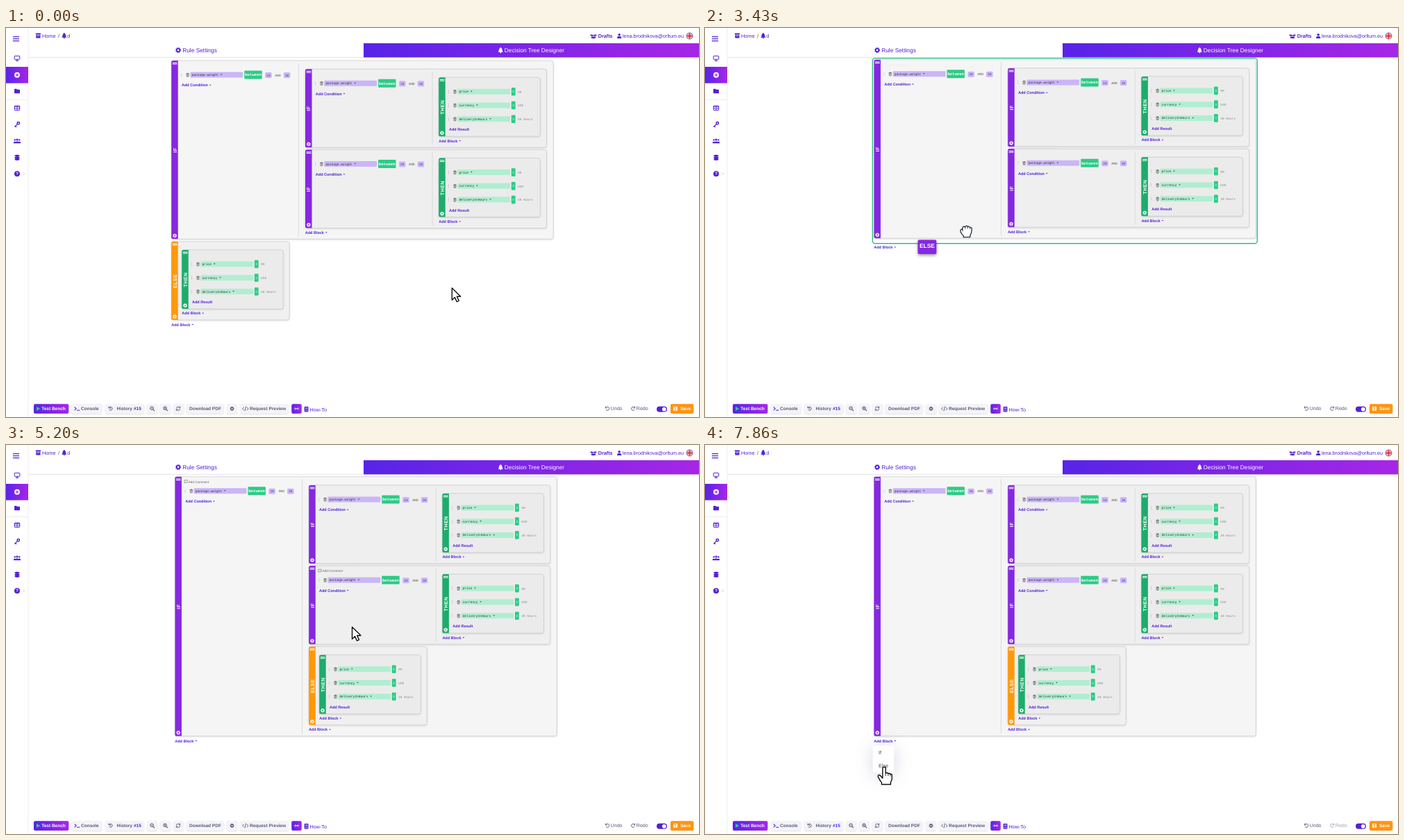
An HTML page that plays this animation: 998x561 px, repeating every 8 s.

```html
<!DOCTYPE html>
<html lang="en">
<head>
<meta charset="utf-8">
<title>Decision Tree Designer</title>
<style>
  html, body { margin: 0; width: 100%; height: 100%; overflow: hidden; background: #fff; }
  svg { display: block; width: 998px; height: 561px; font-family: "Liberation Sans", Arial, sans-serif; text-rendering: geometricPrecision; }
  .mono { font-family: "Liberation Mono", "Courier New", monospace; }
  .b { font-weight: bold; }
  .card { stroke: #cfcfcf; stroke-width: .8; }
  .soft { filter: drop-shadow(0 1px 1px rgba(0, 0, 0, .12)); }
  .tile { filter: drop-shadow(0 2px 2px rgba(0, 0, 0, .4)); }
  .menu { filter: drop-shadow(0 3px 12px rgba(70, 60, 120, .22)); }
  .cursor { fill: #fff; stroke: #111; stroke-width: 1.4; stroke-linejoin: round; stroke-linecap: round; }
  .grab { stroke: #2b3440; }
</style>
</head>
<body>
<svg id="stage" viewBox="0 0 998 561" xmlns="http://www.w3.org/2000/svg">
  <defs>
    <linearGradient id="grad"><stop stop-color="#5624e8"/><stop offset="1" stop-color="#a726e6"/></linearGradient>
    <clipPath id="round"><circle r="4.9"/></clipPath>
  </defs>
</svg>
<script>
const LOOP = 8000;
const C = { main: '#5122d6', ink: '#54597a', violet: '#8528e0', green: '#1dac6c', orange: '#ff9808',
            lime: '#2ecb87', mint: '#b0eed1', lilac: '#cab5f8' };
const stage = document.getElementById('stage');

// Drawing helpers
const rect = (x, y, w, h, fill, r = 0, more = '') =>
  `<rect x="${x}" y="${y}" width="${w}" height="${h}" rx="${r}" fill="${fill}" ${more}/>`;
const circle = (x, y, r, fill, more = '') => `<circle cx="${x}" cy="${y}" r="${r}" fill="${fill}" ${more}/>`;
const path = (d, fill, more = '') => `<path d="${d}" fill="${fill}" ${more}/>`;
const line = (d, color, w = 1) => path(d, 'none', `stroke="${color}" stroke-width="${w}" stroke-linecap="round" stroke-linejoin="round"`);
const at = (x, y, body, more = '') => `<g transform="translate(${x} ${y})" ${more}>${body}</g>`;
const text = (x, y, s, size, fill, cls = '', more = '') =>
  `<text x="${x}" y="${y + size * .35}" font-size="${size}" fill="${fill}" class="${cls}" ${more}>${s}</text>`;
const mid = 'text-anchor="middle"';
const caret = (x, y, fill) => path(`M${x - 1.4} ${y - .7}h2.8l-1.4 1.5z`, fill);

const gear = (x, y, r, color) =>
  circle(x, y, r * .58, 'none', `stroke="${color}" stroke-width="${r * .45}"`) +
  circle(x, y, r * .85, 'none', `stroke="${color}" stroke-width="${r * .35}" stroke-dasharray="${r * .334}"`);
const trash = (x, y) =>
  rect(x - 1.5, y - 1.2, 3, 3.8, 'none', .5, 'stroke="#555" stroke-width=".7"') +
  line(`M${x - 2} ${y - 1.6}h4M${x - .6} ${y - 2.3}h1.2M${x} ${y - .4}v2`, '#555', .6);
const dots = (x, y) => [-1.8, 0, 1.8].map(d => circle(x, y + d, .45, '#888')).join('');
const tree = (x, y, color) =>
  at(x, y, path('M0-4.2 2.4-1.4H1.5L3.1.6H2L3.6 2.8H.7V4.2H-.7V2.8H-3.6L-2 .6H-3.1L-1.5-1.4H-2.4z', color));
const person = (x, y, s, color) =>
  at(x, y, circle(0, -1.8, 1.8, color) + path('M-3.1 3.6V2.4Q-3 .5-1 .5H1Q3 .5 3.1 2.4V3.6z', color), `transform-origin="0 0"`)
    .replace('translate(', `scale(1) translate(`).replace(/\) ?"/, `) scale(${s})"`);

// Decision blocks
const link = (x, y, s, em) => text(x, y, s, 5.5, C.main, 'b') + caret(x + em * 5.5 + 3.3, y, C.main);
const addBlock = (x, y) => link(x, y, 'Add Block', 4.945);

function block(x, y, w, h, label, color, fill) {
  const cy = y + h / 2 + .5;
  return rect(x, y, w, h, fill, 3, 'class="card soft"') +
    path(`M${x + 9.5} ${y}v${h}H${x + 2}q-2 0-2-2V${y + 2}q0-2 2-2z`, color) +
    line(`M${x + 1.9} ${y + 3.2}h6M${x + 1.9} ${y + 5}h6`, '#fff', 1) +
    gear(x + 4.8, y + h - 4.8, 2.9, '#fff') +
    `<g transform="translate(${x + 4.9} ${cy}) rotate(-90)">${text(0, 0, label, 7, '#fff', 'b', mid + ' letter-spacing=".5"')}</g>`;
}

const field = (x, y, s, fill) => rect(x, y - 4, 75.8, 8, fill, 1) +
  text(x + 2.2, y, s, 4.55, '#333', 'mono') + caret(x + 6.4 + s.length * 2.73, y - .3, '#444');

function thenBlock(x, y) {
  const rows = [['price', '99'], ['currency', 'USD'], ['deliveryInHours', '48 Hours']];
  return block(x, y, 146, 85, 'THEN', C.green, '#ebebeb') +
    rows.map(([name, value], i) => {
      const cy = y + 20.5 + i * 19.75;
      return dots(x + 14.4, cy) + trash(x + 23.3, cy) + field(x + 27, cy, name, C.mint) +
        rect(x + 104.6, cy - 5.8, 5.8, 11.6, C.lime, 1) +
        text(x + 107.5, cy, '=', 4.5, '#fff', 'mono b', mid) +
        text(x + 113.8, cy + .3, value, 4.55, '#888', 'mono');
    }).join('') +
    text(x + 14.8, y + 75.2, 'Add Result', 5.5, C.main, 'b') + addBlock(x, y + 91.5);
}

const pill = (x, y, s) => rect(x, y - 4, 9.4, 8, C.lilac, 1.5) + text(x + 4.7, y + .2, s, 4.5, '#5530a8', 'mono', mid);

function ifBlock(x, y, w, h, from, to, fill) {
  const cy = y + 20.5;
  return block(x, y, w, h, 'IF', C.violet, fill) +
    dots(x + 14.6, cy) + trash(x + 23.4, cy) + field(x + 27.2, cy, 'package.weight', C.lilac) +
    rect(x + 105, cy - 6, 25.5, 12, C.lime, 1) + text(x + 117.7, cy, 'between', 5.7, '#fff', 'mono b', mid) +
    pill(x + 135, cy + .5, from) + text(x + 149, cy + .5, 'AND', 4.8, '#555', 'mono') + pill(x + 161.7, cy + .5, to) +
    link(x + 14.8, y + 35.5, 'Add Condition', 6.888) +
    line(`M${x + 183} ${y + 4}V${y + h - 4}`, '#d3d3d3', .8);
}

const innerIf = (x, y, from, to) =>
  ifBlock(x, y, 347.5, 113, from, to, '#efefef') + thenBlock(x + 192.2, y + 12);
const elseBlock = (x, y) => block(x, y, 170, 113, 'ELSE', C.orange, '#f0f0f0') + thenBlock(x + 15, y + 12);

const outer = (x, y, h, gap = 0) =>
  ifBlock(x, y, 550, h, '10', '30', '#f5f5f5') +
  innerIf(x + 192.8, y + 12.2, '10', '20') + innerIf(x + 192.8, y + 128.6 + gap, '20', '30') +
  addBlock(x + 192.5, y + h - 9.3);

const outline = (x, y, w, h) => rect(x, y, w, h, 'none', 3.5, 'stroke="#2fbd87" stroke-width="1.4"');
const comment = (x, y) =>
  path(`M${x + 13.6} ${y + 5}h4.2v3.4h-2.6l-1 1v-1h-.6z`, 'none', 'stroke="#666" stroke-width=".6"') +
  text(x + 19.4, y + 7.3, 'Add Comment', 4.6, '#666');

// Page frame
function sidebar() {
  const m = C.main;
  return rect(0, 0, 32, 561, '#fff') + line('M32 0V561', '#eeeef4', 1) +
    line('M10.4 12.7h8.2M10.4 15.7h8.2M10.4 18.7h8.2', m, 1.2) +
    rect(12.2, 40.3, 7.6, 5, 'none', .8, `stroke="${m}"`) + line('M14.2 47.3h3.6M16 45.5v1.5', m, 1) +
    rect(0, 56, 32, 23.6, 'url(#grad)') + circle(16, 67.8, 4, '#fff') + line('M14 67.8h4M16 65.8v4', '#7526e6', 1.1) +
    path('M12 88.5q0-.7.7-.7h2.4l1 1h3.2q.7 0 .7.7v4q0 .7-.7.7h-6.6q-.7 0-.7-.7z', m) +
    line('M0 103.5H31', '#e8e8f0', .8) +
    rect(12.3, 112.3, 7.4, 6.2, 'none', .6, `stroke="${m}"`) + line('M12.3 113.2h7.4M12.3 115.8h7.4M16 113v5', m, .9) +
    circle(17.8, 137.2, 1.7, 'none', `stroke="${m}" stroke-width="1.5"`) + line('M16.4 138.6 12.8 142.3M13.6 141.5l1 1', m, 1.3) +
    [[-3.3, 1.2, 1.3], [3.3, 1.2, 1.3], [0, 1.6, 1.6]].map(([dx, r, w]) =>
      circle(16 + dx, 161 + (dx ? .4 : 0), r, m) +
      path(`M${16 + dx - w * 1.4} 166.3v-1q0-1.9 1.9-1.9h${w * 2.8 - 3.8}q1.9 0 1.9 1.9v1z`, m)).join('') +
    [183.4, 186, 188.6].map(y => path(`M12.6 ${y}q3.4-1.5 6.8 0v1.7q-3.4 1.6-6.8 0z`, m)).join('') +
    circle(16, 210.2, 4, m) + text(16, 210.2, '?', 6, '#fff', 'b', mid) + line('M25.2 208.8l1.3 1.4-1.3 1.4', '#aaa', .7);
}

function header() {
  const m = C.main;
  return rect(42.8, 7.6, 7.2, 2, m, .4) + rect(43.3, 10.2, 6.2, 4.2, m, .4) + line('M45.4 11.4h2', '#fff', .7) +
    text(52, 11, 'Home', 7.3, m) + text(75, 11, '/', 7.3, '#444') + tree(83.8, 11, m) + text(88.3, 11, 'd', 7.3, m) +
    path('M842 9.2l4 .8 4-.8 .6 1.8-3.4.9-1.2-1.4-1.2 1.4-3.4-.9zM842.8 12.2l2.4.5.8-.9.8.9 2.4-.5v2.2l-3.2.8-3.2-.8z', m) +
    text(852.8, 11.4, 'Drafts', 7.2, m, 'b') +
    circle(883.2, 9.7, 1.8, m) + path('M880.1 15v-1.2q.1-1.8 2-1.8h2.2q1.9 0 2 1.8V15z', m) +
    text(888, 11.4, 'lena.brodnikova@orltum.eu', 7.2, m) +
    at(984.5, 11.5, `<g clip-path="url(#round)">${rect(-5, -5, 10, 10, '#27408f')}` +
      line('M-5-5 5 5M5-5-5 5', '#fff', 2) + line('M-5-5 5 5M5-5-5 5', '#d42b3c', .8) +
      line('M-5 0H5M0-5V5', '#fff', 3.2) + line('M-5 0H5M0-5V5', '#d42b3c', 1.9) + '</g>') +
    line('M32 42.4H998', '#dcdce2', .8) +
    gear(248, 32, 3.9, m) + text(254.2, 32, 'Rule Settings', 8.35, m) +
    rect(515, 22, 483, 20.3, 'url(#grad)') + tree(712.3, 32, '#fff') + text(717.8, 32, 'Decision Tree Designer', 8.3, '#fff');
}

const button = (x, w, fill = '#f4f4f8') => rect(x, 542.3, w, 13.6, fill, 2, 'class="soft"');
const zoom = (x, sign) => circle(x - .5, 548.3, 2.3, 'none', `stroke="${C.ink}"`) +
  line(`M${x + 1.3} 550.1l1.8 1.8`, C.ink, 1.2) + line(`M${x - 1.6} 548.3h2.2${sign}`, C.ink, .7);
const turn = (x, flip) => `<g transform="translate(${x} 548.8) scale(${flip} 1)">` +
  line('M-2-1.5A2.6 2.6 0 1 1-1.7 2M-2.6-2.7v1.9h1.9', 'currentColor', .9) + '</g>';

function toolbar() {
  const y = 549, k = C.ink;
  const label = (x, s, color = k) => text(x, y, s, 6.5, color, 'b');
  return button(40, 50.3, 'url(#grad)') + path('M44 546l5.4 3-5.4 3z', '#26d07c') + label(51.2, 'Test Bench', '#fff') +
    button(94.5, 43.8) + line('M99 546.8l2.2 2-2.2 2M102.4 551.3h3.4', C.main, 1.1) + label(108, 'Console') +
    button(143, 56) + `<g color="${k}">${turn(150.5, 1)}</g>` + line('M150.5 547.4v1.6l1 .7', k, .7) +
    label(159.5, 'History') + label(184, '#15', C.main) +
    button(203, 15) + zoom(210.5, '') + button(222, 15) + zoom(229.5, 'm-1.1-1.1v2.2') +
    button(241, 15) + line('M245.3 548.4a2.7 2.7 0 0 1 5-.9M250.7 546v1.8h-1.8M250.7 549.4a2.7 2.7 0 0 1-5 .9M245.3 551.8V550h1.8', k, .9) +
    button(260, 53.5) + label(264, 'Download PDF') +
    button(318, 15) + gear(325.5, y, 3, k) +
    button(337, 70) + line('M342.5 547l-2 2 2 2M347 547l2 2-2 2M345.5 546l-1.4 6', k, .9) + label(351, 'Request Preview') +
    button(411.3, 14.4, 'url(#grad)') + line('M415.2 549h6.6M416.6 547.8l1.2 1.2-1.2 1.2M420.4 547.8l-1.2 1.2 1.2 1.2', '#fff', .8) +
    rect(429.6, 546, 5.9, 7.8, C.main, 1) + line('M431.2 547.8h2.8M431.2 549.2h2.8M430.8 552h4', '#fff', .6) +
    text(437.6, 550.2, 'How-To', 7.2, C.main) +
    `<g color="${k}">${turn(866, 1)}</g>` + text(870.6, y, 'Undo', 7.1, k) +
    `<g id="redo" color="${k}">${turn(903.2, -1)}${text(907.8, y, 'Redo', 7.1, 'currentColor')}</g>` +
    rect(937, 545.8, 15, 8, C.main, 4) + circle(947.8, 549.8, 2.9, '#fff') +
    button(957, 33.3, '#ff9410') + rect(961.2, 546, 5.8, 5.8, '#fff', .8) + rect(962.2, 546.8, 3.2, 1.5, '#ff9410') +
    circle(964.1, 550, 1, '#ff9410') + label(971, 'Save', '#fff');
}

// Each part is shown between two times: [start, end, markup]
const scenes = [
  [0, 3100, outer(238.2, 47, 257.3) + elseBlock(238.2, 308) + addBlock(238.2, 427.6)],
  [3100, 3900, outer(243.4, 45.7, 257.5) + addBlock(243.2, 316.2) + outline(241.3, 43.6, 554, 267.2)],
  [3900, 5200, outer(243.4, 45.7, 263.5, 1.8) + addBlock(243.2, 316.2) + outline(433.6, 55.6, 352, 239.2)],
  [5200, LOOP, outer(243.4, 45.7, 374) + elseBlock(436.2, 290.7) + addBlock(243.2, 426.8)],
];
const menu = [6900, LOOP, rect(241.6, 433.4, 30.6, 39.4, '#fff', 2.5, 'class="menu"') +
  text(250, 443, 'If', 7.2, '#444') + text(250, 462.4, 'Else', 7.2, '#444')];

// Hover hints: [x, y, fade in from, to, fade out from, to]
const hints = [
  [238.2, 308, 1040, 1300, 3099, 3100],
  [253.2, 320, 1140, 1400, 1500, 1790],
  [243.4, 45.7, 3400, 3960, 6300, 6500],
  [436.2, 176.1, 3900, 4030, 5199, 5200],
  [436.2, 174.3, 5199, 5200, 5920, 6250],
];

// Pointer: [start, end, x, y, bend of the y course]
const start = [642.3, 375];
const moves = [
  [560, 1360, 270, 336, 1],
  [1400, 1800, 240.5, 312, 1],
  [3060, 3860, 498.5, 262.5, 1.5],
  [5700, 6500, 262, 428, 1],
  [7230, 7860, 258, 464.5, 1],
];
const shapes = {
  arrow: path('M0 0V17.2L4 13.4 6.9 19.8 9.9 18.4 7.1 12.2H12.4z', '#fff', 'class="cursor"'),
  hand: path('M-2.2 2a2.2 2.2 0 0 1 4.4 0V8.6q2.4-1 3.6.7q2-.8 3.1.8q2.4-.4 2.3 2V17q0 2-1.8 4.6V25H-3.6V22.4Q-6.2 19.4-8.6 14.4q-.8-2.4 1-2.9q1.8-.3 3.2 2.1l2.2 2.3z', '#fff', 'class="cursor"') +
    line('M2.2 8.6v3.6M5.8 9.4v3M8.9 10.2v2.6', '#111', .9),
  open: path('M-5 10.5Q-6 7-9.5 2.6q-1-2.4 1-2.8q1.6 0 3.4 3L-6.6-4.6q-.4-2 1.2-2.4q1.4-.2 2 1.8L-2.4-8.4q0-2 1.6-2t1.7 2L1.3-7.8q.5-1.6 2-1.3t1.4 2.2L4.8-5q.8-1.4 2.2-.9t1.2 2.4Q8.2 3 5.6 7V10.5z', '#fff', 'class="cursor grab"') +
    line('M-3.2-5.2-2.2-.8M1-8V-1M4.7-6 4.2-.6', '#2b3440', 1),
  fist: path('M-4 8.5V6.5Q-8.5 2-8.3-1q.4-2.4 3-1.6Q-5.8-6.6-3.4-6.8q1.2-.2 1.8.8Q-.6-8.2 1-7.6q.9.3 1.2 1.2Q4-7.6 5.4-5.4Q8-6 8-3q.2 5-2.4 9.2V8.5z', '#fff', 'class="cursor grab"') +
    line('M-5.3-2.6l.2 2.4M-1.6-6l.2 2.2M2.2-6.2v2.2M5.4-5.2V-3.4', '#2b3440', .9),
};
const kinds = [[0, 'arrow'], [1134, 'hand'], [1630, 'open'], [3100, 'fist'], [4830, 'arrow'], [6440, 'hand']];

const add = markup => {
  stage.insertAdjacentHTML('beforeend', `<g>${markup}</g>`);
  return stage.lastElementChild;
};
add(header() + sidebar() + toolbar());
const timed = [...scenes, menu].map(([a, b, markup]) => [a, b, add(markup)]);
const fades = hints.map(([x, y, ...times]) => [add(comment(x, y)), times]);
const tile = add(rect(0, 0, 26.8, 20.4, C.violet, 1.8, 'class="tile"') + text(13.4, 8.4, 'ELSE', 8.4, '#fff', 'b', mid));
const pointers = Object.fromEntries(Object.entries(shapes).map(([k, markup]) => [k, add(markup)]));
const redo = document.getElementById('redo');

const ramp = (t, a, b) => Math.min(1, Math.max(0, (t - a) / (b - a)));
const ease = p => p + .25 * p * (1 - p);

function pointerAt(t) {
  let [x, y] = start;
  for (const [a, b, toX, toY, bend] of moves) {
    const p = ease(ramp(t, a, b));
    x += (toX - x) * p;
    y += (toY - y) * p ** bend;
  }
  return `translate(${x.toFixed(2)} ${y.toFixed(2)})`;
}

function draw(now) {
  const t = now % LOOP;
  for (const [a, b, el] of timed) el.style.display = t >= a && t < b ? '' : 'none';
  for (const [el, [a, b, c, d]] of fades) el.style.opacity = ramp(t, a, b) * (1 - ramp(t, c, d));

  // The dragged tile trails the pointer by 200 ms
  tile.setAttribute('transform', pointerAt(t - 200));
  tile.style.opacity = t < 3100 ? 0 : 1 - ramp(t, 4830, 5060);

  const kind = kinds.filter(([from]) => t >= from).pop()[1];
  for (const k in pointers) pointers[k].style.display = k === kind ? '' : 'none';
  pointers[kind].setAttribute('transform', pointerAt(t));
  redo.style.opacity = 1 - .45 * ramp(t, 5200, 5500);
}

const begin = performance.now();
function tick() {
  draw(performance.now() - begin);
  requestAnimationFrame(tick);
}
draw(0);
requestAnimationFrame(tick);
</script>
</body>
</html>
```
